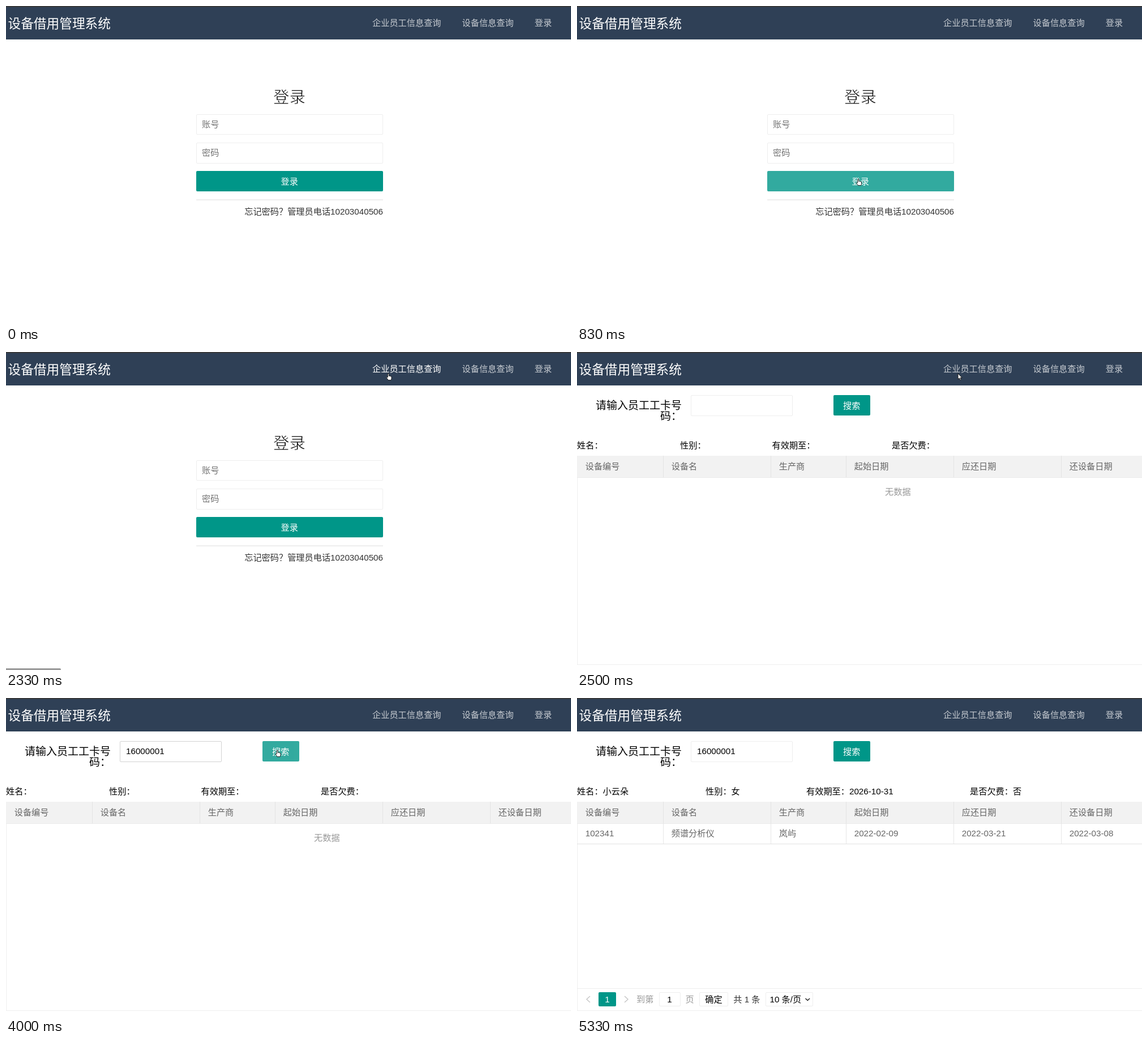
Recreate the animation shown at these times as an HTML page. Size 998 px wide and 561 px high, loop 5490 ms.

```html
<!DOCTYPE html>
<html lang="zh-CN">
<head>
<meta charset="utf-8">
<title>设备借用管理系统</title>
<style>
html, body { margin: 0; width: 100%; height: 100%; overflow: hidden; background: #fff; }
#stage { position: absolute; left: 0; top: 0; width: 998px; height: 561px; overflow: hidden;
  font: 15.2px "Liberation Sans", "Noto Sans CJK SC", "Noto Sans CJK", sans-serif; }
#stage div { position: absolute; box-sizing: border-box; }
.text { white-space: pre; line-height: 30px; height: 30px; }
.page { left: 0; top: 0; width: 998px; height: 561px; }
.box { border: 1px solid #eee; border-radius: 2px; }
.green { background: #009688; border-radius: 2px; }
svg { position: absolute; overflow: visible; }
.cursor { left: 0; top: 0; width: 1px; height: 1px; }
</style>
</head>
<body>
<div id="stage"></div>
<script>
const LOOP = 5490;
const stage = document.getElementById('stage');

function add(parent, cls, style) {
  const el = document.createElement('div');
  el.className = cls;
  Object.assign(el.style, style);
  parent.appendChild(el);
  return el;
}
const page = () => add(stage, 'page', {});
const rect = (parent, x, y, w, h, background, cls = '') =>
  add(parent, cls, { left: x + 'px', top: y + 'px', width: w + 'px', height: h + 'px', background });

// y is the vertical centre of the line
function text(parent, x, y, str, color = '#000', size = 15.2, extra = {}) {
  const el = add(parent, 'text', { left: x + 'px', top: y - 15 + 'px', color, fontSize: size + 'px', ...extra });
  el.textContent = str;
  return el;
}
const rightText = (parent, right, y, str, color, size) =>
  text(parent, 0, y, str, color, size, { left: 'auto', right: 998 - right + 'px' });

function svg(parent, cls, body) {
  const el = document.createElementNS('http://www.w3.org/2000/svg', 'svg');
  el.setAttribute('class', cls);
  el.innerHTML = body;
  parent.appendChild(el);
  return el;
}

// Login page; the white stroke thins the heading to a light weight
const login = page();
text(login, 472, 161, '登录', '#000', 28.5, { fontWeight: 300, webkitTextStroke: '.7px #fff' });
rect(login, 336, 191, 330, 36, '#fff', 'box');
rect(login, 336, 241, 330, 36.5, '#fff', 'box');
text(login, 346, 209, '账号', '#757575');
text(login, 346, 259, '密码', '#757575');
const loginBtn = rect(login, 336, 291.3, 330, 36, '', 'green');
text(loginBtn, 149.5, 18.7, '登录', '#fff');
rect(login, 336, 341, 330, 2, '#eee');
rightText(login, 666, 362.5, '忘记密码？管理员电话10203040506', '#333');

// Search page
const search = page();
rightText(search, 185, 94.5, '请输入员工工卡号', '#000', 19);
rightText(search, 185, 113.5, '码：', '#000', 19);
const field = rect(search, 201, 76, 180, 36.5, '#fff', 'box');
const value = text(search, 212, 94, '16000001');
const searchBtn = rect(search, 453, 76.3, 65, 36, '', 'green');
text(searchBtn, 17, 18.7, '搜索', '#fff');

const columns = [0, 152, 342, 475, 665, 855];
rect(search, 0, 183, 998, 38.5, '#f2f2f2');
rect(search, 0, 221, 998, 1, '#eaeaea');
rect(search, 0, 221, 1, 331, '#eee');
rect(search, 0, 551, 998, 1, '#eee');
['设备编号', '设备名', '生产商', '起始日期', '应还日期', '还设备日期'].forEach((name, i) => {
  if (i) rect(search, columns[i], 183, 1, 38, '#e4e4e4');
  text(search, columns[i] + 14.7, 202, name, '#666');
});

const empty = page();
[[0, '姓名：'], [182, '性别：'], [344.5, '有效期至：'], [556, '是否欠费：']]
  .forEach(([x, s]) => text(empty, x, 164.5, s));
text(empty, 544, 247, '无数据', '#999');

const result = page();
[[0, '姓名：小云朵'], [227, '性别：女'], [405, '有效期至：2026-10-31'], [694, '是否欠费：否']]
  .forEach(([x, s]) => text(result, x, 164.5, s));
['102341', '频谱分析仪', '岚屿', '2022-02-09', '2022-03-21', '2022-03-08'].forEach((s, i) => {
  if (i) rect(result, columns[i], 221, 1, 37, '#e6e6e6');
  text(result, columns[i] + 14.7, 238.5, s, '#666');
});
rect(result, 0, 257, 998, 1, '#e2e2e2');

// Pager
rect(result, 0, 512, 998, 1, '#eee');
rect(result, 38, 518.8, 31, 25, '', 'green');
text(result, 49.3, 531.5, '1', '#fff');
text(result, 105, 531.5, '到第', '#999');
rect(result, 144.5, 519, 38, 25, '#fff', 'box');
text(result, 159.3, 531.5, '1');
text(result, 191.5, 531.5, '页', '#999');
rect(result, 216, 519, 51, 25, '#fff', 'box');
text(result, 226.3, 531.5, '确定');
text(result, 276.3, 531.5, '共 1 条', '#333');
rect(result, 333, 519, 84, 25, '#fff', 'box');
text(result, 340.5, 531.5, '10 条/页');
svg(result, '', `<g fill="none">
  <path d="M23 526l-6 5.5 6 5.5M84 526l6 5.5-6 5.5" stroke="#c4c4c4" stroke-width="1.3"/>
  <path d="M403.5 530l3.8 3.6 3.8-3.6" stroke="#222" stroke-width="1.4"/></g>`);

// Top bar
rect(stage, 0, 0, 998, 59, '#2f4056');
rect(stage, 0, 0, 998, 2, '#38393c');
text(stage, 3.5, 31, '设备借用管理系统', '#fff', 22.7);
const links = [[647, '企业员工信息查询'], [805.5, '设备信息查询'], [933.7, '登录']]
  .map(([x, s]) => text(stage, x, 30.4, s));
const status = rect(stage, 0, 558, 97, 4, '#9b9b9b');
status.style.borderTopRightRadius = '2px';

// Pointers, each drawn around its own centre
const outline = 'stroke="#111" stroke-width=".9" stroke-linejoin="round"';
const pointers = {
  hand: `<path d="M-2.2 .8V-5a1 1 0 0 1 2 0v3.4q1-.7 1.8.2 1-.5 1.6.4 1.3-.2 1.3 1V2.4Q4.5 4 3.6 5.6H-1.5Q-2 4-4 1.9-4.6.6-3.6.2-2.8 0-2.2.8Z" fill="#fff" ${outline}/>`,
  arrow: `<path d="M-3.5-6V4L-1.2 2 .4 5.6 2 4.9.5 1.4H3.6Z" fill="#fff" ${outline}/>`,
  beam: '<path d="M-2-4H-.5L0-3.5.5-4H2M-2 4H-.5L0 3.5.5 4H2M0-3.5V3.5" fill="none" stroke="#555" stroke-width="1"/>'
};
const cursors = {};
for (const k in pointers) cursors[k] = svg(stage, 'cursor', pointers[k]);

// time, pointer, x, y, button opacity, lit link
const steps = [
  [0],
  [170, 'arrow', 63, 6],
  [330, 'arrow', 300, 235],
  [500, 'hand', 427.5, 312, .867],
  [670, 'hand', 468, 311, .8],
  [830, 'hand', 498, 311, .8],
  [1000, 'hand', 530, 308, .8],
  [1170, 'arrow', 620, 240, .9],
  [1330, 'arrow', 795, 120],
  [1500, 'hand', 870, 59, 1, 1],
  [1670, 'hand', 838, 48, 1, 1],
  [1830, 'hand', 800, 44, 1, 1],
  [2000, 'hand', 745, 43, 1, 0],
  [2170, 'hand', 700, 44, 1, 0],
  [2330, 'hand', 676.5, 44, 1, 0],
  [2500, 'arrow', 676.5, 44],
  [2830, 'arrow', 570, 62],
  [3000, 'arrow', 385, 86],
  [3170, 'beam', 250, 99.5],
  [3330, 'beam', 250, 99.5],
  [3500, 'arrow', 248, 138],
  [3670, 'arrow', 290, 134],
  [3830, 'hand', 472, 99, .87],
  [4000, 'hand', 480.5, 98, .8],
  [4830, 'hand', 484, 103, .8],
  [5000, '', 0, 0, .86],
  [5170, '', 0, 0, .96],
  [5330]
];

const show = (el, on) => { el.style.visibility = on ? 'visible' : 'hidden'; };
const within = (t, a, b) => t >= a && t < b;

function draw(t) {
  const [, kind, x, y, opacity = 1, lit = -1] = steps.filter(s => s[0] <= t).pop();
  show(login, t < 2500);
  show(search, t >= 2500);
  show(empty, within(t, 2500, 4170));
  show(result, t >= 4170);
  show(value, t >= 3670);
  show(status, within(t, 1670, 2500));
  loginBtn.style.opacity = searchBtn.style.opacity = opacity;
  field.style.borderColor = within(t, 3330, 4170) ? '#d2d2d2' : '#eee';
  links.forEach((el, i) => { el.style.color = i === lit ? '#fff' : 'rgba(255,255,255,.72)'; });
  for (const k in cursors) show(cursors[k], k === kind);
  if (kind) cursors[kind].style.transform = `translate(${x}px, ${y}px)`;
}

const start = performance.now();
function tick() {
  draw((performance.now() - start) % LOOP);
  requestAnimationFrame(tick);
}
tick();
</script>
</body>
</html>
```
